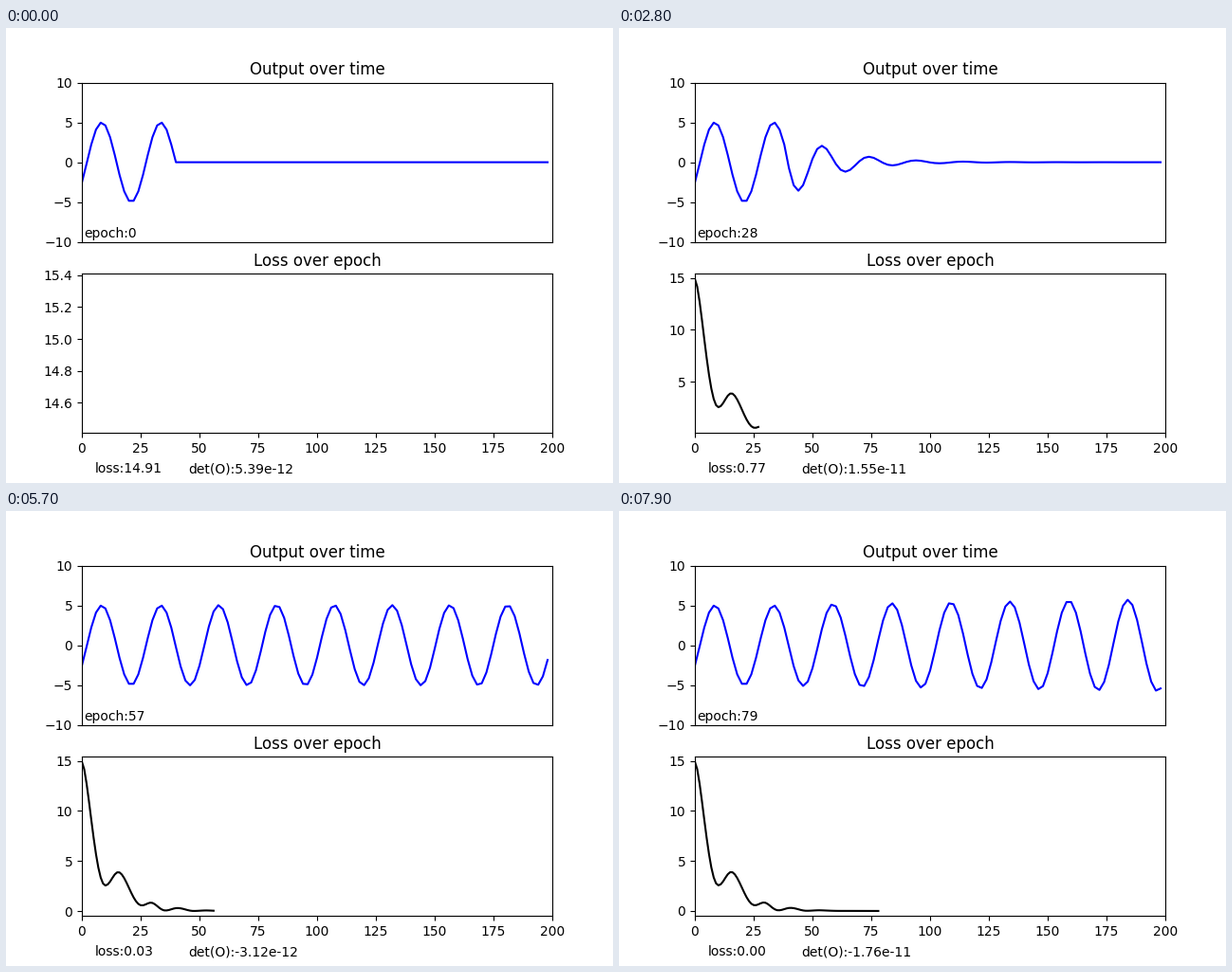
Animation of 640 by 480 pixels, one loop 8 s. Source, as a matplotlib script:

```python
import numpy as np
import matplotlib.pyplot as plt
from matplotlib.animation import FuncAnimation

EPOCHS = 80
SEEN = 20  # samples given before the free run begins

# Turning points of the loss: epoch, value, skew of the ease that follows
TURNS = np.array([
    (0, 14.91, 0.8), (10, 2.56, 1), (15.5, 3.9, 0.915), (25.5, 0.57, 1),
    (29.4, 0.85, 0.92), (35.5, 0.065, 1), (40.6, 0.31, 1), (47.5, 0.02, 1),
    (53, 0.07, 0.7), (62, 0.008, 1), (79, 0.003, 1),
])

# Key moments of the free run: epoch, growth rate, angular frequency
MODES = np.array([
    (0, -0.4, 0), (10, -0.015, 0), (15, 0.07, 0), (20, -0.075, 0.0095),
    (28, -0.055, 0.314), (40, 0.0275, 0.2095), (45, 0.001, 0.23),
    (57, 0, 0.2558), (70, 0.0053, 0.242), (79, 0.0008, 0.2505),
])


def loss_at(epoch):
    """Sine ease from one turning point to the next."""
    at, value, skew = TURNS.T
    i = np.clip(np.searchsorted(at, epoch, side="right") - 1, 0, len(at) - 2)
    u = ((epoch - at[i]) / (at[i + 1] - at[i])) ** skew[i]
    return value[i] + (value[i + 1] - value[i]) * np.sin(np.pi / 2 * u) ** 2


def output(epoch):
    """Given sine wave, then a growing or fading wave that carries on from it."""
    at, growth, freq = MODES.T
    growth, freq = np.interp(epoch, at, growth), np.interp(epoch, at, freq)
    amp = 5.1 * (1 - np.exp(-epoch / 13))
    y = -5 * np.cos((time - 21) / 4)
    t = time[SEEN:] - time[SEEN]
    y[SEEN:] = amp * np.exp(growth * t) * np.sin(0.4625 - freq * (t + 2))
    return y


time = np.arange(0, 200, 2.0)
losses = loss_at(np.arange(EPOCHS))

# The determinant is rounding noise around zero
rng = np.random.default_rng(4)
dets = rng.choice([-1, 1], EPOCHS) * 10 ** rng.uniform(-13, -10.5, EPOCHS)

fig, (top, bottom) = plt.subplots(2, 1, figsize=(6.4, 4.8), dpi=100)
top.set(title="Output over time", xlim=(0, 200), ylim=(-10, 10), xticks=[])
bottom.set(title="Loss over epoch", xlim=(0, 200))
wave, = top.plot([], [], color="b")
history, = bottom.plot([], [], color="k")
epoch_text = top.text(1, -9.5, "")
loss_text = fig.text(0.1465, 0.0225, "")
det_text = fig.text(0.3, 0.0225, "")


def update(epoch):
    wave.set_data(time, output(epoch))
    history.set_data(np.arange(epoch), losses[:epoch])
    past = losses[:max(epoch, 1)]
    bottom.set_ylim(past.min() - 0.5, past.max() + 0.5)
    epoch_text.set_text(f"epoch:{epoch}")
    loss_text.set_text(f"loss:{losses[epoch]:.2f}")
    det_text.set_text(f"det(O):{dets[epoch]:.2e}")
    return wave, history, epoch_text, loss_text, det_text


anim = FuncAnimation(fig, update, frames=EPOCHS, interval=100,
                     repeat=True, repeat_delay=0)
plt.show()
```
